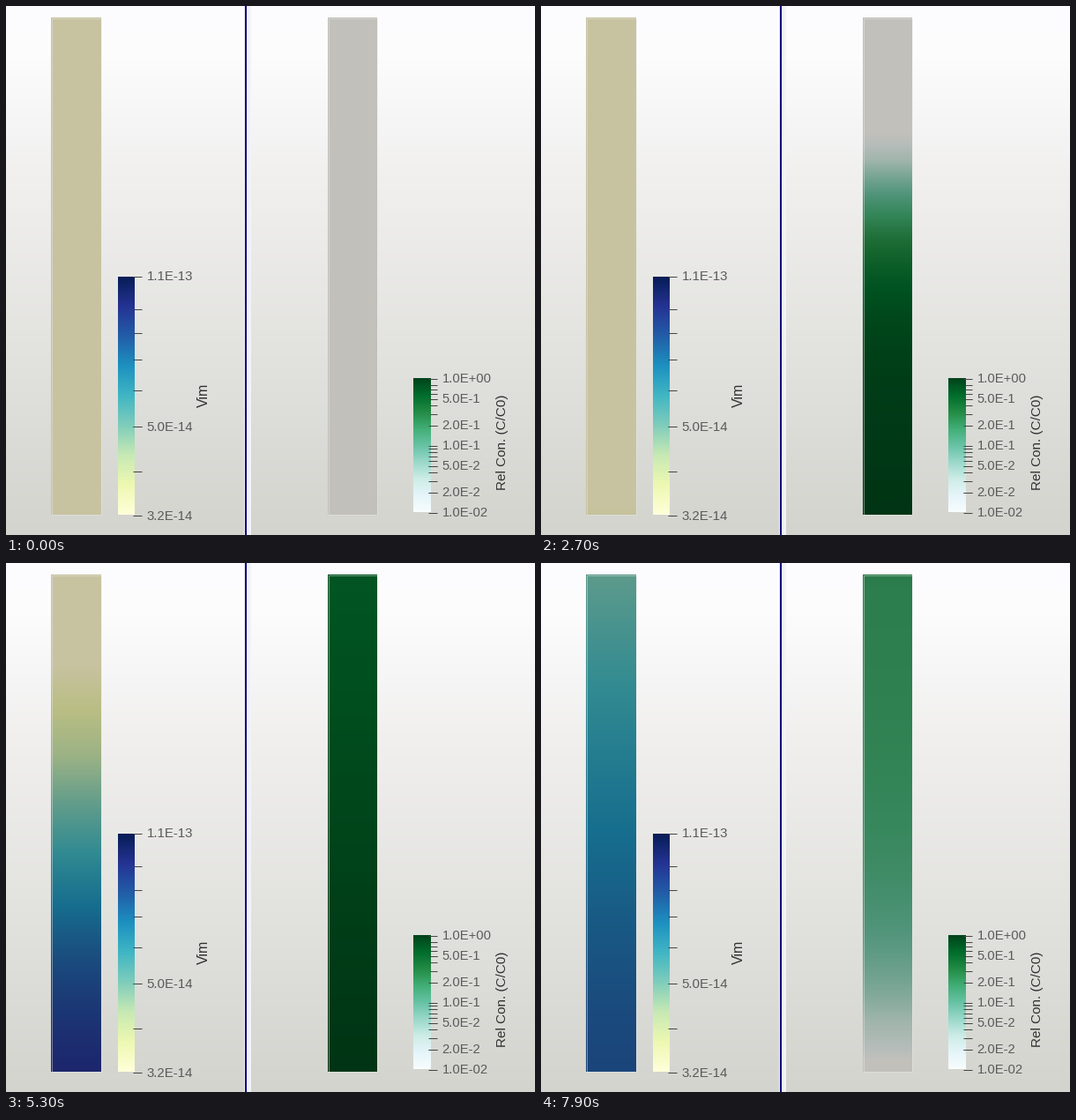
A matplotlib script that plays this animation: 600x600 px, repeating every 8 s.

```python
import math

import numpy as np
import matplotlib.pyplot as plt
from matplotlib.animation import FuncAnimation
from matplotlib.colors import LinearSegmentedColormap

SIZE, FRAMES, STEP = 600, 80, 100
TOP, BOTTOM = 13, 577
Z = BOTTOM - np.arange(TOP, BOTTOM) - 0.5  # height above the inlet
H = BOTTOM - TOP
LIGHT = np.array([0.782, 0.765, 0.742])    # shading of the 3D columns
INK, DARK = "#5a5a5a", "#303030"

plt.rcParams["font.family"] = "Liberation Sans"
fig = plt.figure(figsize=(6, 6), dpi=100)
ax = fig.add_axes([0, 0, 1, 1])
ax.axis("off")

BLUES = plt.get_cmap("YlGnBu", 512)
GREENS = plt.get_cmap("BuGn", 512)
SKY = LinearSegmentedColormap.from_list("sky", [
    (0, "#fdfdff"), (0.1, "#fcfcfd"), (0.32, "#f1f0ef"), (1, "#d3d4ce")], 600)
erfc = np.vectorize(math.erfc)


def strip(rgb, x0, x1, y0, y1, z=2):
    return ax.imshow(rgb, extent=(x0, x1, y1, y0), aspect="auto",
                     interpolation="nearest", zorder=z)


def ramp(cmap, n):
    return cmap(np.linspace(1, 0, n))[:, None, :3]


def band(x0, x1, color):
    ax.fill([x0, x1, x1, x0], [0, 0, SIZE, SIZE], color=color, lw=0, zorder=1)


def label(x, y, text, px=15, color=INK, **kw):
    ax.text(x, y, text, fontsize=px * 0.72, color=color, va="baseline",
            zorder=4, **kw)


def title(x, y, text, px):
    label(x, y, text, px, DARK, rotation=90, rotation_mode="anchor")


def tick(x0, x1, y):
    y = math.floor(y) + 0.5
    ax.plot([x0, x1], [y, y], color="#454545", lw=0.72, zorder=3,
            solid_capstyle="butt")


def backdrop():
    strip(ramp(SKY, SIZE)[::-1], 0, SIZE, 0, SIZE, 0)
    band(270, 271, "#e9e9ee")
    band(271, 272.7, "#00007f")
    band(273, 278, "#f3f3f6")


def vim_y(v):
    return 578.3 - 227 * math.log(v / 3.2)


def conc_y(v):
    return 422.5 - 76 * math.log10(v)


def legends():
    strip(ramp(BLUES, 270), 127, 146, 307, 577)
    for v in range(4, 10):
        tick(144, 154, vim_y(v))
    for v, text in ((10.6, "1.1E-13"), (5, "5.0E-14"), (3.2, "3.2E-14")):
        tick(144, 154, vim_y(v) - 0.4)
        label(159.5, vim_y(v) + 4.6, text)
    title(229, 455, "Vim", 16)

    strip(ramp(GREENS, 152), 462, 482, 422, 574)
    for m in range(2, 10):
        tick(479, 489, conc_y(m / 100))
        if m < 9:
            tick(481, 489, conc_y(m / 10))
    for v, text in ((1, "1.0E+00"), (.5, "5.0E-1"), (.2, "2.0E-1"),
                    (.1, "1.0E-1"), (.05, "5.0E-2"), (.02, "2.0E-2"),
                    (.01, "1.0E-02")):
        tick(479, 489, conc_y(v))
        label(494.5, conc_y(v) + 4.5, text, 14.8)
    title(567.5, 549, "Rel Con. (C/C0)", 15.2)


def column(rgb, x0, x1):
    img = strip(rgb, x0, x1, TOP, BOTTOM)
    l, r, t, b = x0 + 0.5, x1 - 0.5, TOP + 0.5, BOTTOM - 0.5
    ax.plot([l, r, r, l, l], [t, t, b, b, t], color="#e8e8e6", alpha=0.45,
            lw=0.72, zorder=3)
    return img


def soft(x, p):
    """Rises linearly, then levels off at 1; p sets how sharply."""
    x = np.maximum(x, 0)
    return x / (1 + x ** p) ** (1 / p)


def vim(t):
    """A front climbs the column, then the whole profile settles back."""
    tau = max(t - 2.65, 0)
    edge = 187 * tau - 4.7 * tau ** 2
    grown = soft((edge - Z) / (317 + 38 * tau), 4)
    settled = 0.76 - 0.37 * (Z / H) ** 1.4
    fade = np.clip((t - 6.3) / 1.6, 0, 1)
    return grown + (settled - grown) * fade


def conc(t):
    """Log-scaled tracer: dispersive inflow, then flushing from below."""
    tau = t - 1.55
    if tau <= 0:
        return np.zeros_like(Z)
    c = 0.5 * erfc((Z - 260 * tau) / (82 * math.sqrt(tau)))
    u = 1 + np.log10(np.maximum(c, 1e-4)) / 2 - 0.14 * Z / H
    s = t - 5.45
    if s > 0:
        front = soft(Z / (195 * (s / 0.85) ** 1.36), 6)
        tail = 0.66 * (1 - np.exp((5 - Z) / 112))
        u = np.minimum(u, np.maximum(front, tail) - 0.15 * np.exp(-Z / 12))
    return np.clip(u, 0, 1)


def shade(cmap, u):
    return (cmap(u)[:, :3] * LIGHT)[:, None]


def draw(i):
    t = i * STEP / 1000
    left.set_data(shade(BLUES, vim(t)))
    right.set_data(shade(GREENS, conc(t)))
    return left, right


backdrop()
legends()
left = column(shade(BLUES, vim(0)), 51, 108)
right = column(shade(GREENS, conc(0)), 365, 421)
ax.set_xlim(0, SIZE)
ax.set_ylim(SIZE, 0)

anim = FuncAnimation(fig, draw, frames=FRAMES, interval=STEP, repeat=True,
                     repeat_delay=0, blit=False)
plt.show()
```
